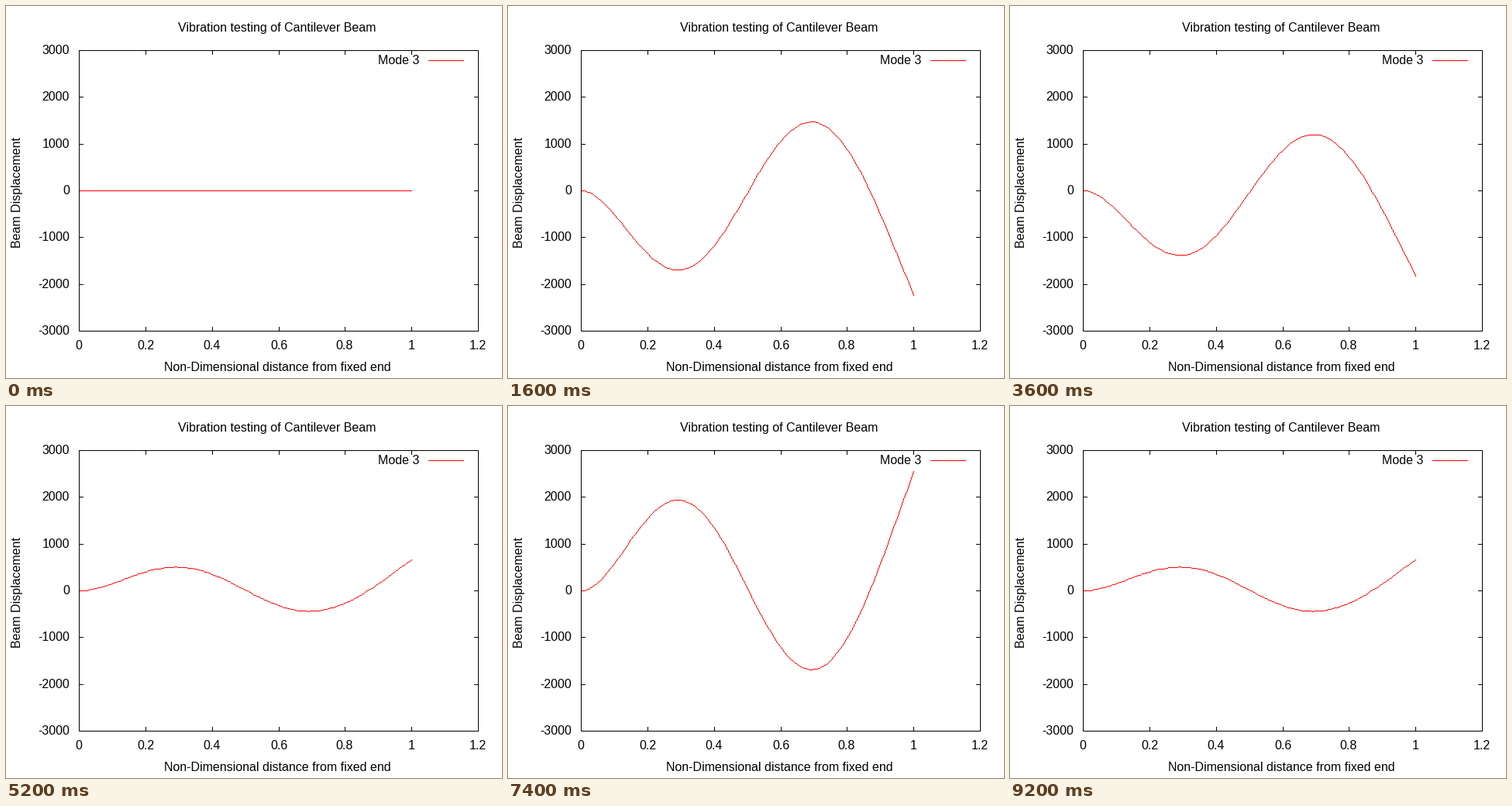
A matplotlib script for the animation above (9400 ms loop, 640 px wide and 480 px high).

```python
import numpy as np
import matplotlib.pyplot as plt
from matplotlib.animation import FuncAnimation
from matplotlib.patches import Rectangle

W, H, DPI = 640, 480, 80
LEFT, RIGHT, TOP, BOTTOM = 94, 609, 57, 419
X_MAX, Y_MAX = 1.2, 3000
MIDDLE = (TOP + BOTTOM) // 2
TICK = 5
FRAMES, PERIOD, INTERVAL = 47, 48, 200
RED = "#ff0000"

plt.rcParams["font.family"] = "Liberation Sans"
plt.rcParams["font.size"] = 16 * 72 / DPI

fig = plt.figure(figsize=(W / DPI, H / DPI), dpi=DPI, facecolor="white")
ax = fig.add_axes([0, 0, 1, 1])
ax.set_xlim(0, W)
ax.set_ylim(H, 0)
ax.axis("off")


def to_px(x):
    return np.floor(LEFT + (RIGHT - LEFT) * x / X_MAX + 0.5).astype(int)


def to_py(y):
    return MIDDLE - np.floor((BOTTOM - MIDDLE) * y / Y_MAX + 0.5).astype(int)


def bar(x0, y0, x1, y1, color="black", z=1):
    """One-pixel horizontal or vertical line, both ends included."""
    ax.add_patch(Rectangle((x0, y0), x1 - x0 + 1, y1 - y0 + 1, lw=0,
                           facecolor=color, antialiased=False, zorder=z))


def label(x, y, text, ha="center", **kw):
    ax.text(x, y, text, ha=ha, va="baseline", color="black", **kw)


def raster(px, py):
    """Pixels of a thin polyline through whole-pixel points."""
    xs, ys = [], []
    for x0, y0, x1, y1 in zip(px[:-1], py[:-1], px[1:], py[1:]):
        n = max(abs(x1 - x0), abs(y1 - y0), 1) + 1
        xs.append(np.rint(np.linspace(x0, x1, n)))
        ys.append(np.rint(np.linspace(y0, y1, n)))
    return np.concatenate(xs), np.concatenate(ys)


def mode_shape(x, b=7.854757):
    """Third bending mode of a clamped-free beam."""
    return ((np.sin(b) + np.sinh(b)) * (np.cosh(b * x) - np.cos(b * x))
            - (np.cos(b) + np.cosh(b)) * (np.sinh(b * x) - np.sin(b * x)))


# Axes
for i in range(7):
    x = int(to_px(0.2 * i))
    bar(x, TOP, x, TOP + TICK)
    bar(x, BOTTOM - TICK, x, BOTTOM)
    label(x, 443, f"{0.2 * i:.1f}".removesuffix(".0"))

for value in range(-Y_MAX, Y_MAX + 1, 1000):
    y = int(to_py(value))
    bar(LEFT, y, LEFT + TICK, y)
    bar(RIGHT - TICK, y, RIGHT, y)
    label(82, y + 5, str(value), ha="right")

for y in (TOP, BOTTOM):
    bar(LEFT, y, RIGHT, y, z=4)
for x in (LEFT, RIGHT):
    bar(x, TOP, x, BOTTOM, z=4)

# Captions and legend
label(350, 33, "Vibration testing of Cantilever Beam")
label(350, 471, "Non-Dimensional distance from fixed end")
label(19, 240, "Beam Displacement", rotation=90, rotation_mode="anchor")
label(533, 75, "Mode 3", ha="right")
bar(545, 70, 590, 70, RED)

# Beam
span = np.linspace(0, 1, 101)
span_px = to_px(span)
shape = mode_shape(span)
beam, = ax.plot([], [], linestyle="none", marker=",", color=RED, zorder=3)


def draw(k):
    swing = -np.sin(2 * np.pi * k / PERIOD)
    xs, ys = raster(span_px, to_py(swing * shape))
    beam.set_data(xs, ys + 1)  # a pixel marker fills the row above its point
    return beam,


anim = FuncAnimation(fig, draw, frames=FRAMES, interval=INTERVAL,
                     repeat=True, repeat_delay=0, blit=False)
plt.show()
```
